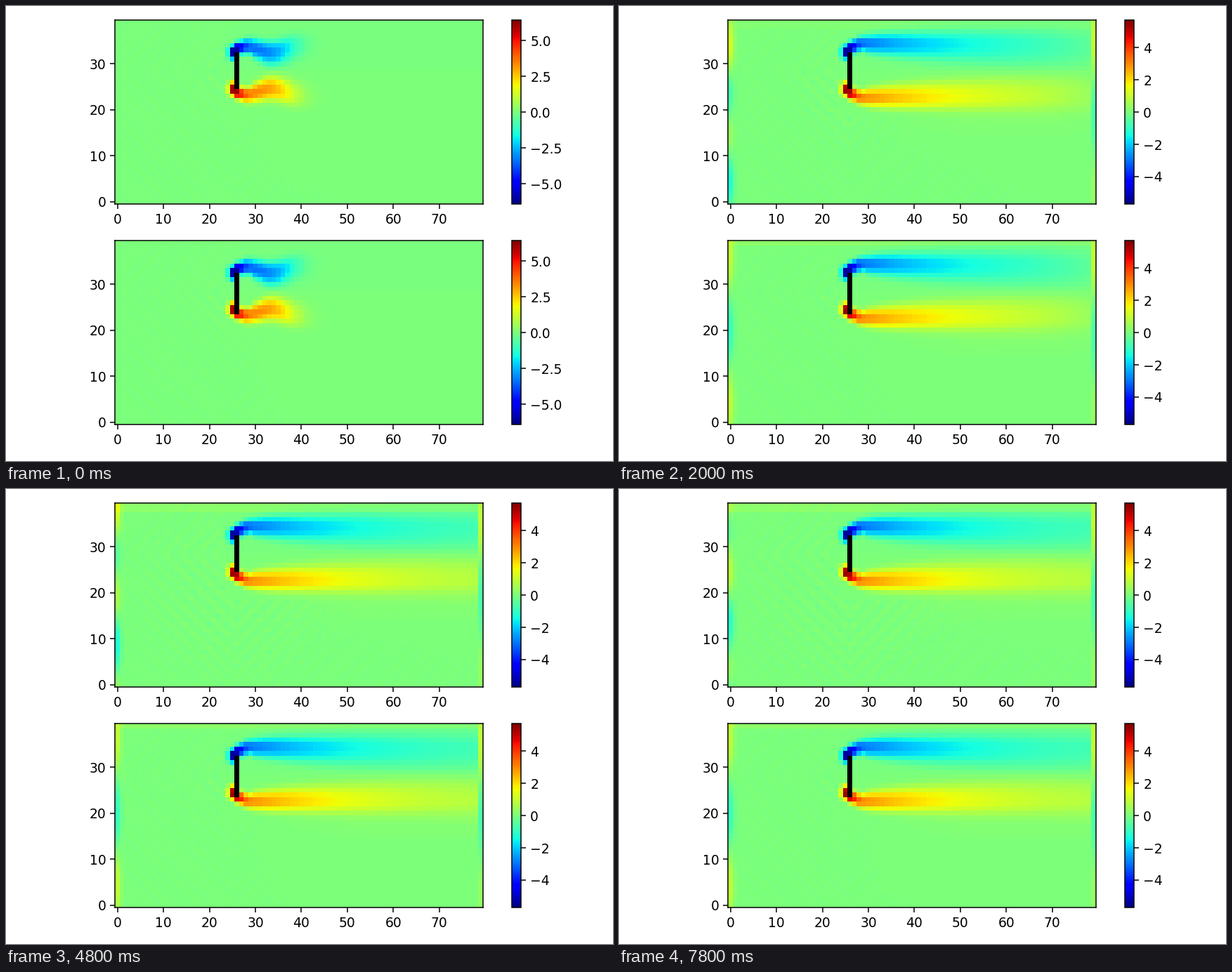
A matplotlib script that plays this animation: 864x648 px, repeating every 8000 ms.

```python
import numpy as np
import matplotlib.pyplot as plt
from matplotlib.animation import FuncAnimation

W, H, DPI = 864, 648, 135
NX, NY = 80, 40
FRAMES, INTERVAL = 40, 200
PLATE_X, PLATE_TOP = 26, 33
MIRROR = 57                     # rows y and MIRROR - y carry opposite spin

X, Y = np.meshgrid(np.arange(NX), np.arange(NY))


def past(x0):
    return np.maximum(X - x0, 0)


# steady layer behind the lower plate tip, relative to the peak vorticity
AMP = .06 + .5 * np.exp(-(X - 27) / 24) + .45 * np.exp(-((X - 25) / 2.2) ** 2)
AMP = AMP / (1 + np.exp(-np.clip((X - 24.3) / .25, -60, 60)))
MID = 22.4 + .017 * past(27) + 2 * np.exp(-past(25) / 2)
OUTER = 1.3 + .30 * np.sqrt(past(27))
INNER = 1.5 + .48 * np.sqrt(past(29))


def peak(k):
    return 5.70 + .71 * np.exp(-.68 * k)


def shear_layer(k):
    """Positive layer shed by the lower tip, with its moving front."""
    front = 38.5 + 4 * k
    width = min(1.8 + .45 * k, 5)
    reach = 1 / (1 + np.exp(np.clip((X - front) / width, -40, 40)))
    roll = np.exp(-((X - front + 5) / 4.5) ** 2) * np.exp(-k / 4)
    d = Y - MID - 1.9 * roll
    half = np.where(d < 0, OUTER, INNER) + .2 * roll
    core = AMP * (1 + .12 * roll) * np.exp(-(np.abs(d) / half) ** 2.6)
    skirt = .03 * np.exp(-((Y - 20) / 5) ** 2) * np.clip((X - 30) / 25, 0, 1)
    return (core + skirt) * reach


def ripples(k, top):
    """Faint diagonal checks spreading from the plate."""
    dx, dy = np.abs(X - PLATE_X), np.abs(Y - MIRROR / 2)
    drift = .9 * k if top else 0
    checks = np.cos(1.75 * (dx + dy) - drift) * (.6 + .4 * np.cos(1.3 * (dx - dy)))
    reach = 8 + min(.5 * k, 14) if top else 7.5
    sink = min(.3 * k, 8) if top else 0
    fade = np.exp(-(np.hypot(X - 25, Y - 27 + sink) / reach) ** 2)
    return .03 * checks * fade * ((X < 24) | (Y < 19))


def wave(mid, length):
    return np.cos(2 * np.pi * (np.arange(NY) - mid) / length)


def field(k, top):
    layer = shear_layer(k)
    flip = np.zeros_like(layer)
    flip[MIRROR - NY + 1:] = layer[MIRROR - NY + 1:][::-1]
    w = layer - flip + ripples(k, top)

    # boundary columns and the upper wall
    grow = np.clip((k - 1) / 9, 0, 1)
    late = np.clip((k - 5) / 5, 0, 1)
    if top:
        left = .13 * wave(14 + .34 * max(k - 10, 0), 20) + .09 * wave(37, 60)
        w[38:] += .04 * min(k / 25, 1)
    else:
        left = .16 * wave(36, 32)
        w[39] += .04 * grow
    right = .18 * wave(35, 34) * np.linspace(.3, 1, NY)
    w[:, 0] += grow * left
    w[:, 1] += .25 * grow * left
    w[:, -1] = (1 - late) * w[:, -1] + late * right

    w = np.clip(w, -1, 1) * peak(k)
    w[(25 if top else 24):PLATE_TOP, PLATE_X] = np.nan
    return np.ma.masked_invalid(w)


def box(x0, y0, x1, y1):
    return [x0 / W, 1 - y1 / H, (x1 - x0) / W, (y1 - y0) / H]


fig = plt.figure(figsize=(W / DPI, H / DPI), dpi=DPI, facecolor="white")
cmap = plt.get_cmap("jet").copy()
cmap.set_bad("black")

images = []
for y0, top in ((20.3, True), (334.3, False)):
    y1 = y0 + 261.7
    ax = fig.add_axes(box(155.4, y0, 678.8, y1))
    im = ax.imshow(field(0, top), cmap=cmap, origin="lower", aspect="auto",
                   interpolation="nearest", vmin=-peak(0), vmax=peak(0))
    ax.set_xticks(range(0, NX, 10))
    ax.set_yticks(range(0, NY, 10))
    fig.colorbar(im, cax=fig.add_axes(box(720, y0, 733.1, y1)))
    images.append((im, top))


def update(k):
    for im, top in images:
        im.set_data(field(k, top))
        im.set_clim(-peak(k), peak(k))
    return [im for im, _ in images]


anim = FuncAnimation(fig, update, frames=FRAMES, interval=INTERVAL,
                     repeat=True, repeat_delay=0, blit=False)
plt.show()
```
